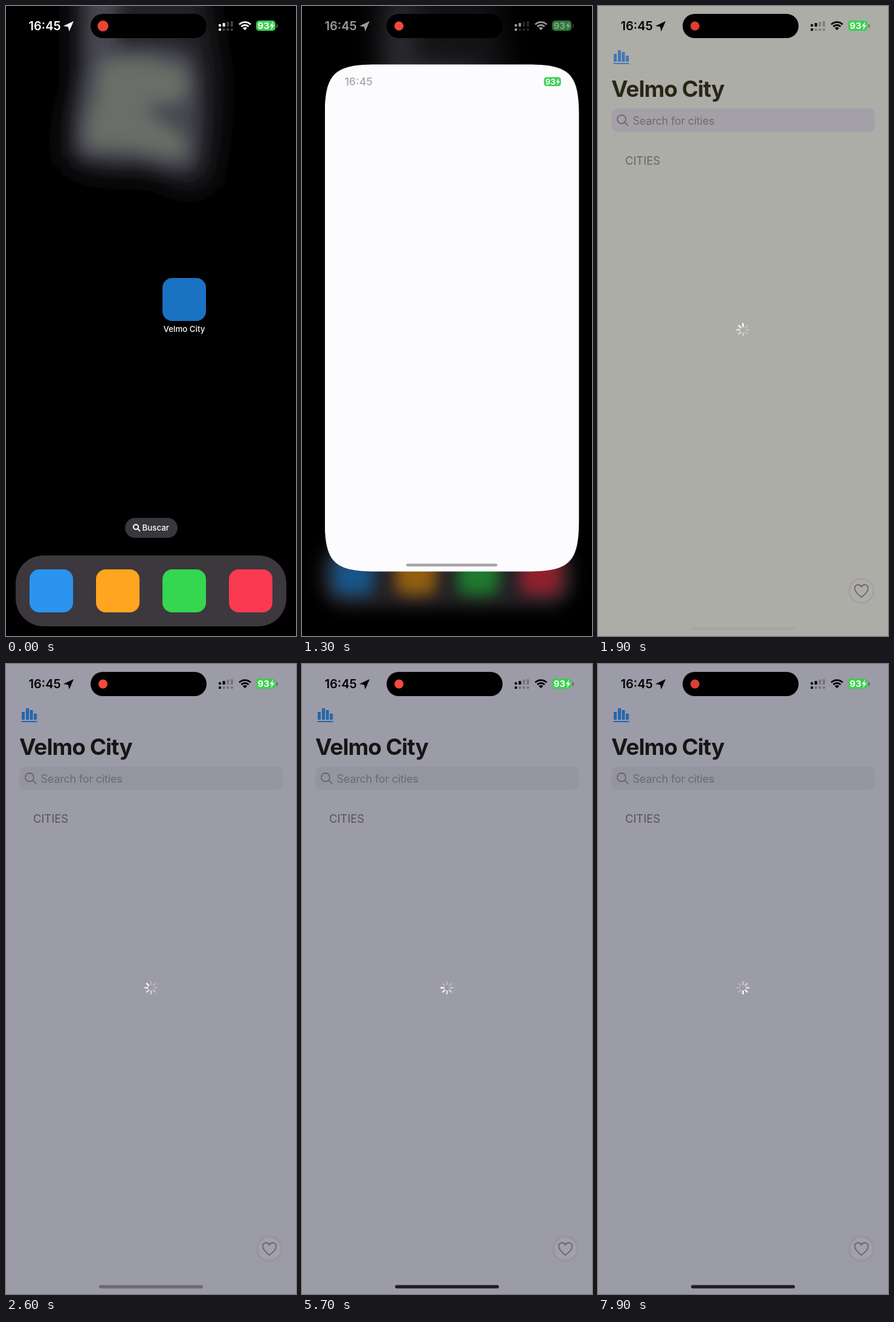
An HTML page that plays this animation: 480 px wide and 1040 px high, repeating every 8000 ms.

```html
<!DOCTYPE html>
<html lang="en">
<head>
<meta charset="utf-8">
<title>App launch</title>
<style>
  html, body { margin: 0; width: 480px; height: 1040px; overflow: hidden; background: #000; }
  svg { display: block; font-family: Inter, "Open Sans", sans-serif; }
  #home { transform-origin: 240px 520px; }
  .line { fill: none; stroke-width: 2; stroke-linecap: round; stroke-linejoin: round; }
</style>
</head>
<body>
<svg id="stage" width="480" height="1040" viewBox="0 0 480 1040">
  <defs>
    <filter id="soft" x="-50%" y="-50%" width="200%" height="200%"><feGaussianBlur stdDeviation="14"/></filter>
    <filter id="softer" x="-50%" y="-50%" width="200%" height="200%"><feGaussianBlur stdDeviation="22"/></filter>
  </defs>

  <g id="home">
    <path filter="url(#softer)" fill="#222228" d="M112 -60H325L352 100Q358 200 335 300Q285 308 240 276Q160 286 100 262Q88 210 112 130Z"/>
    <path filter="url(#soft)" fill="#464651" d="M134 -50H186V66Q270 60 308 82Q326 150 314 262Q285 282 225 256Q170 262 118 246Q110 180 130 100V30Z"/>
    <path filter="url(#soft)" fill="#6a6e68" d="M156 90Q235 78 294 104Q310 140 290 156L226 168L292 215Q312 256 270 248Q200 232 138 234Q124 205 146 160Z"/>
    <rect id="appIcon" x="259" y="449" width="72" height="71" rx="16" fill="#1a72c2"/>
    <g fill="#fff" font-size="13.3" font-weight="500">
      <text x="295" y="538" text-anchor="middle">Velmo City</text>
      <rect x="197" y="845" width="87" height="33" rx="16.5" fill="#39363c"/>
      <text x="225.500" y="865.500">Buscar</text>
      <path class="line" stroke="#fff" d="M218.500 863.500l3 3M211 860a4 4 0 1 0 8 0a4 4 0 1 0 -8 0"/>
    </g>
    <rect x="16" y="907" width="448" height="117" rx="46" fill="#3c383e"/>
    <g id="dock"></g>
  </g>
  <g id="homeStatus"></g>

  <g id="win">
    <path id="page" fill="#fcfcff"/>
    <g id="app">
      <rect width="480" height="1040" fill="var(--bg)"/>
      <path fill="var(--blue)" d="M26 79h5v13h-5zM33 73h5v19h-5zM39.500 76h5v16h-5zM46 82h5v10h-5zM25.500 94h26v2h-26z"/>
      <text x="22" y="150" font-size="37" font-weight="700" letter-spacing="-1" fill="var(--title)">Velmo City</text>
      <rect x="22" y="169" width="436" height="39" rx="10" fill="var(--field)"/>
      <path class="line" stroke="var(--hint)" d="M44.500 192.500l5 4.500M32 187a7 7 0 1 0 14 0a7 7 0 1 0 -14 0"/>
      <text x="57.500" y="195.500" font-size="18" letter-spacing="-.2" fill="var(--hint)">Search for cities</text>
      <text x="45" y="262" font-size="18.400" fill="var(--head)">CITIES</text>
      <circle cx="436" cy="965.500" r="20" fill="var(--button)" stroke="var(--field)" stroke-width="3"/>
      <path class="line" stroke="var(--hint)" d="M436 976C431 972 425 967 425 961.500C425 955 432.500 953 436 959C439.500 953 447 955 447 961.500C447 967 441 972 436 976Z"/>
      <g id="spinner" stroke="#fff" stroke-width="2.6" stroke-linecap="round" transform="translate(240 534.500)"></g>
      <rect id="veil" width="480" height="1040" fill="#fcfcff"/>
    </g>
    <path id="tint" fill="#1a72c2"/>
    <g id="winStatus"></g>
    <rect id="homeBar" x="154" width="172" height="5.500" rx="2.750"/>
  </g>

  <rect x="140" y="13" width="192" height="40" rx="20"/>
  <circle id="dot" cx="160.500" cy="33"/>
</svg>
<script>
const LOOP = 8000, STEP = 100, OPEN = 1000, OPENED = 1700, LOADED = 1800;
const $ = id => document.getElementById(id);
const set = (id, attrs) => { for (const k in attrs) $(id).setAttribute(k, attrs[k]); };
const clamp = x => Math.max(0, Math.min(1, x));
const mix = (a, b, k) => a + (b - a) * k;
const mixColor = (a, b, k) => `rgb(${a.map((v, i) => Math.round(mix(v, b[i], k)))})`;

// Each colour right after loading, then once the dimming has settled.
const palette = {
  bg: [[173, 173, 167], [156, 155, 168]],
  blue: [[66, 120, 182], [36, 104, 172]],
  title: [[40, 38, 22], [22, 22, 22]],
  field: [[164, 160, 168], [149, 149, 162]],
  hint: [[112, 110, 98], [106, 105, 114]],
  head: [[104, 102, 88], [84, 83, 92]],
  button: [[175, 173, 170], [162, 160, 168]]
};

const bars = [4, 6, 8, 9].map((h, i) => {
  const x = 352 + i * 6.6;
  return `<rect x="${x}" y="${34 - h}" width="4" height="${h}" rx="1" opacity="${i < 2 ? 1 : .25}"/>
    <rect x="${x}" y="37" width="4" height="4" rx="1" opacity="${i ? .25 : 1}"/>`;
}).join('');
const arc = r => {
  const d = r * Math.SQRT1_2;
  return `M${395.5 - d} ${40 - d}A${r} ${r} 0 0 1 ${395.5 + d} ${40 - d}`;
};
const status = color => `
  <g fill="${color}">
    <text class="time" x="37.500" y="40" font-size="20" font-weight="600">16:45</text>
    <g class="extras">
      <path d="M112 25L95 33L103 34.500L104.500 42Z"/>
      ${bars}
      <path d="${arc(5)}L395.500 40Z"/>
      <path d="${arc(8.5)}${arc(13.3)}" fill="none" stroke="${color}" stroke-width="2.8"/>
      <rect x="447.500" y="30" width="2" height="6" rx="1" opacity=".4"/>
    </g>
  </g>
  <rect x="414" y="24" width="32" height="17" rx="5" fill="#3bcf52"/>
  <text x="416.500" y="38" font-size="15" font-weight="700" fill="#fff">93</text>
  <path d="M442 26L436.500 33.500H440L438.500 39.500L444.500 31.500H441Z" fill="#fff"/>`;

// Rectangle with continuous corners that reach e along each side.
function squircle(w, h, e) {
  const c = e * .18;
  return `M0 ${e}C0 ${c} ${c} 0 ${e} 0H${w - e}C${w - c} 0 ${w} ${c} ${w} ${e}V${h - e}
    C${w} ${h - c} ${w - c} ${h} ${w - e} ${h}H${e}C${c} ${h} 0 ${h - c} 0 ${h - e}Z`;
}

$('homeStatus').innerHTML = status('#fff');
$('winStatus').innerHTML = status('#000');
$('dock').innerHTML = ['#2b94ee', '#ffa51f', '#35d650', '#fa3a50'].map((c, i) =>
  `<rect x="${39 + i * 110}" y="930" width="72" height="71" rx="16" fill="${c}"/>`).join('');
$('spinner').innerHTML = Array.from({ length: 8 }, (_, i) =>
  `<path d="M0 -5.500V-9.800" transform="rotate(${i * 45})"/>`).join('');
const blades = [...$('spinner').children];
const winTime = $('winStatus').querySelector('.time');
const winExtras = $('winStatus').querySelector('.extras');

function drawOpening(t) {
  const opening = t >= OPEN;
  const p = 1 - (1 - clamp((t - OPEN) / (OPENED - OPEN))) ** 3.45;

  $('home').style.transform = `scale(${1 - .07 * p})`;
  $('home').style.filter = opening ? `blur(${15 * p}px) brightness(${1 - .5 * p})` : 'none';
  set('home', { visibility: t >= LOADED ? 'hidden' : 'visible' });
  set('appIcon', { visibility: opening ? 'hidden' : 'visible' });
  set('homeStatus', { opacity: 1 - .47 * p, visibility: p === 1 ? 'hidden' : 'visible' });
  set('win', { display: opening ? 'inline' : 'none' });

  const scale = mix(72, 480, p) / 480;
  const height = mix(71, 1040, p ** 1.5) / scale;
  const x = mix(295, 240, p) - 240 * scale;
  const y = mix(485, 520, p) - height * scale / 2;
  const d = squircle(480, height, t >= LOADED ? 0 : mix(24, 95, p) / scale);
  set('win', { transform: `translate(${x} ${y}) scale(${scale})` });
  set('page', { d });
  set('tint', { d, opacity: clamp(1 - p * 2.5) });
  set('homeBar', { y: height - 14.7 });
  set('winStatus', { opacity: clamp(p * 3 - 1) });
  winTime.setAttribute('opacity', mix(.3, 1, clamp((p - .86) * 8)));
  winExtras.setAttribute('opacity', clamp((p - .88) * 10));
}

function drawApp(t) {
  const settle = clamp((t - 1900) / 300);
  for (const name in palette) $('stage').style.setProperty('--' + name, mixColor(...palette[name], settle));
  set('app', { display: t >= LOADED ? 'inline' : 'none' });
  set('veil', { opacity: clamp((1900 - t) / 150) });
  set('homeBar', { fill: mixColor([168, 164, 168], [32, 32, 34], clamp((t - 2000) / 1400)) });
  const head = (t - 1900) / 100;
  blades.forEach((blade, i) => {
    const age = ((head - i) % 8 + 8) % 8;
    blade.setAttribute('opacity', Math.max(.25, 1 - age * .15));
  });
}

function draw(now) {
  const t = Math.floor(now % LOOP / STEP) * STEP;
  drawOpening(t);
  drawApp(t);
  const glow = .5 - .5 * Math.cos((t - 400) / 1500 * 2 * Math.PI);
  set('dot', { r: t < OPEN ? 9 : 7.5, fill: mixColor([222, 62, 52], [246, 74, 60], glow) });
}

const start = performance.now();
function tick() {
  draw(performance.now() - start);
  requestAnimationFrame(tick);
}
tick();
</script>
</body>
</html>
```
